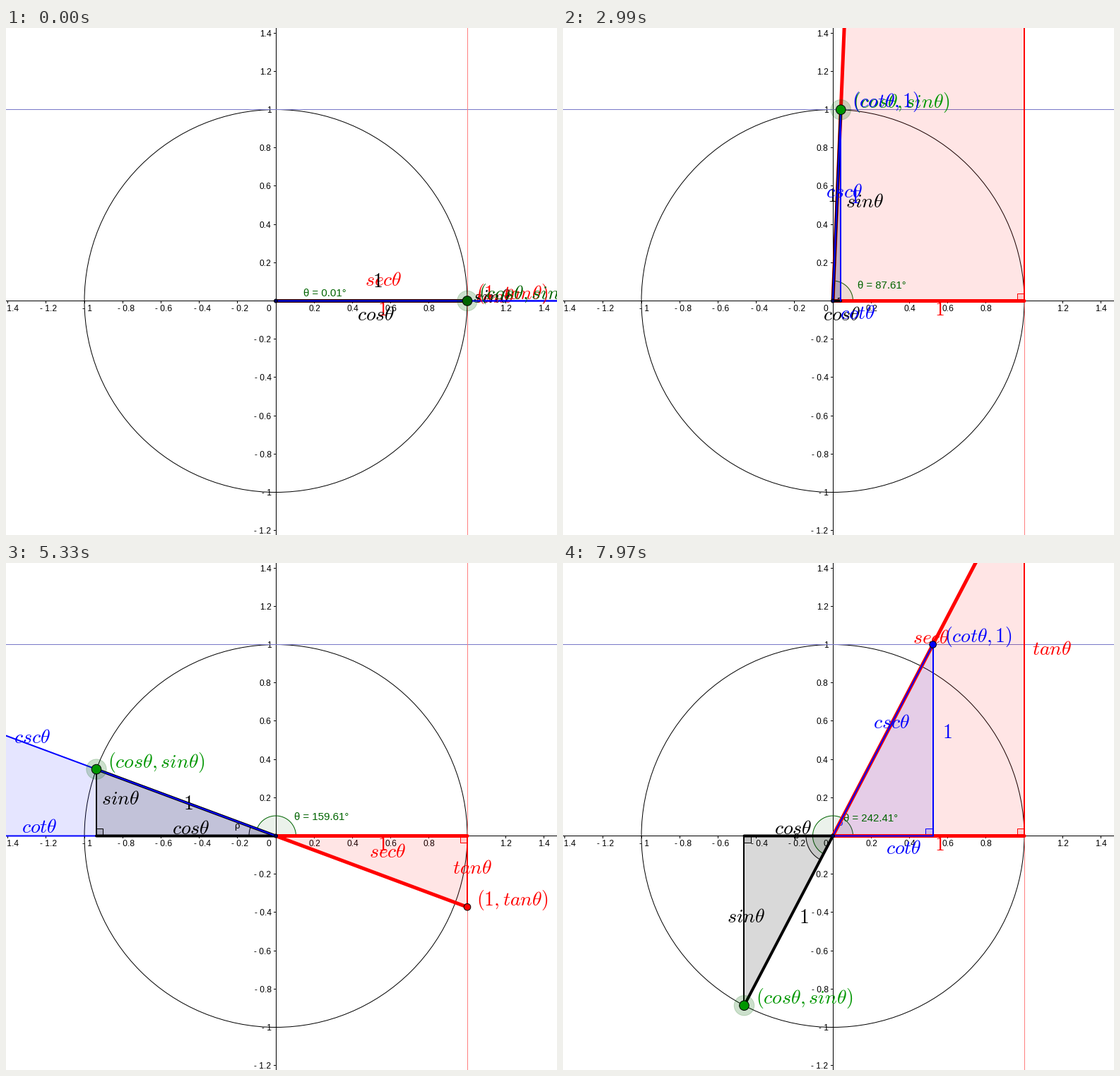
Write a matplotlib script that moves like this. It is 780 px wide and 718 px high and loops after 8 s.

```python
import numpy as np
import matplotlib.pyplot as plt
from matplotlib.animation import FuncAnimation
from matplotlib.patches import Circle, Polygon

plt.rcParams["path.snap"] = False

W, H, DPI = 780, 718, 100
PT = 72 / DPI
OX, OY, UNIT = 382, 386.5, 271
RED, BLUE, BLACK = "#ff0000", "#0000ff", "#000000"
GREEN, DARK_GREEN = "#009600", "#006400"
FRAMES, INTERVAL = 100, 80

fig = plt.figure(figsize=(W / DPI, H / DPI), dpi=DPI, facecolor="white")
ax = fig.add_axes([0, 0, 1, 1])
ax.set_xlim(0, W)
ax.set_ylim(H, 0)
ax.axis("off")


def px(x, y):
    return OX + UNIT * x, OY - UNIT * y


def crisp(v):
    """Centre of the pixel that holds v."""
    return np.floor(v) + 0.5


def line(color, width, z, xs=(), ys=(), cap="round"):
    return ax.plot(xs, ys, color=color, lw=width * PT, zorder=z,
                   solid_capstyle=cap)[0]


def grid_line(xs, ys, color=BLACK):
    line(color, 1, 0, xs, ys, "butt")


def area(color, alpha, z, edge=0):
    shape = Polygon([(0, 0), (0, 0), (0, 0)], closed=True, zorder=z)
    shape.set_facecolor((color, alpha))
    shape.set_edgecolor(color if edge else "none")
    shape.set_linewidth(edge * PT)
    return ax.add_patch(shape)


def dot(color, radius, z):
    return ax.add_patch(Circle((OX, OY), radius, fc=color, ec="black",
                               lw=PT, zorder=z))


def sans(text, x, y, size, color, z, ha="left"):
    return ax.text(x, y + 0.36 * size, text, family="Liberation Sans",
                   fontsize=size * PT, color=color, ha=ha, va="baseline",
                   zorder=z)


def formula(text, color, z):
    return ax.text(0, 0, f"${text}$", math_fontfamily="cm",
                   fontsize=27.8 * PT, color=color, ha="left",
                   va="baseline", zorder=z)


def place(label, x, y):
    label.set_position((x, y))
    label.set_visible(-200 < x < W + 20 and -20 < y < H + 40)


def sector(radius, start, stop):
    a = np.radians(np.linspace(start, stop, 60))
    arc = np.column_stack([OX + radius * np.cos(a), OY - radius * np.sin(a)])
    return np.vstack([[OX, OY], arc])


def corner(x, tip_y):
    """Right-angle mark at the foot (x, OY) of a triangle."""
    size = np.ceil(min(10, 0.33 * abs(x - OX), 0.33 * abs(tip_y - OY)))
    dx = size * np.sign(OX - x)
    dy = size * np.sign(tip_y - OY)
    x = crisp(x)
    return [(x, OY), (x + dx, OY), (x + dx, OY + dy), (x, OY + dy)]


def draw_grid():
    axis_x, axis_y = crisp(OX), crisp(OY)
    grid_line([0, W], [axis_y, axis_y])
    grid_line([axis_x, axis_x], [0, H])
    for i in range(-7, 8):
        if i == 0:
            continue
        v = i / 5
        text = f"{abs(v):g}"
        if v < 0:
            text = "- " + text
        x, y = map(crisp, px(v, v))
        grid_line([x, x], [axis_y, axis_y + 3.5])
        if i != 5:
            sans(text, x + (4 if v < 0 else 0), 397, 12, BLACK, 0, "center")
        if y < H:
            grid_line([axis_x - 3.5, axis_x], [y, y])
            sans(text, 375.5, y + 0.5, 12, BLACK, 0, "right")
    sans("0", 372, 397, 12, BLACK, 0, "center")
    ax.add_patch(Circle((OX, OY), UNIT, fill=False, ec=BLACK, lw=PT, zorder=0))
    x, y = map(crisp, px(1, 1))
    grid_line([0, W], [y, y], "#7878c8")
    grid_line([x, x], [0, H], "#ff8080")


draw_grid()

theta_arc = area(DARK_GREEN, 0.08, 1, 1)
rho_arc = area(BLACK, 0.08, 1, 1)
theta_text = sans("", 0, 0, 15, DARK_GREEN, 1.5)
rho_text = sans("ρ", 0, 0, 13, BLACK, 1.5, "center")
rho_blue = sans("ρ", 392, 367, 13, BLUE, 1.5, "center")

fills = {RED: area(RED, 0.1, 1.1), BLUE: area(BLUE, 0.1, 1.2),
         BLACK: area(BLACK, 0.15, 1.3)}
marks = {c: area(c, 0.1, 1.6, 1) for c in (RED, BLUE, BLACK)}
# base, upright side, slanted side
sides = {RED: [line(RED, w, 2) for w in (5, 2, 5)],
         BLUE: [line(BLUE, 2, z) for z in (3, 4.6, 5)],
         BLACK: [line(BLACK, w, 4) for w in (4, 2, 4)]}

sec_t = formula(r"sec\theta", RED, 2.5)
tan_t = formula(r"tan\theta", RED, 2.5)
red_one = formula("1", RED, 2.5)
cos_t = formula(r"cos\theta", BLACK, 4.5)
sin_t = formula(r"sin\theta", BLACK, 4.5)
hyp_one = formula("1", BLACK, 4.5)
csc_t = formula(r"csc\theta", BLUE, 5.5)
cot_t = formula(r"cot\theta", BLUE, 5.5)
blue_one = formula("1", BLUE, 5.5)
tan_pt = formula(r"(1,tan\theta)", RED, 7)
circ_pt = formula(r"(cos\theta,sin\theta)", GREEN, 7.5)
cot_pt = formula(r"(cot\theta,1)", BLUE, 8)

dot("#000060", 2.5, 6)
blue_dot = dot(BLUE, 4.8, 6)
red_dot = dot(RED, 4.8, 6)
halo = ax.add_patch(Circle((OX, OY), 14.2, fc=(DARK_GREEN, 0.2),
                           ec=(DARK_GREEN, 0.2), lw=PT, zorder=6.5))
green_dot = dot(GREEN, 6.8, 6.6)


def set_triangle(color, x, y):
    fills[color].set_xy([(OX, OY), (x, OY), (x, y)])
    marks[color].set_xy(corner(x, y))
    base, side, slant = sides[color]
    base.set_data([OX, x], [OY, OY])
    side.set_data([round(x), round(x)], [OY, y])
    slant.set_data([OX, x], [OY, y])


def set_angles(deg):
    half = np.radians(deg / 2)
    theta_arc.set_xy(sector(28.5, 0, deg))
    theta_text.set_text(f"θ = {deg:.2f}°")
    theta_text.set_position((405 + 16.3 * np.cos(half),
                             380.4 - 17 * np.sin(half)))
    obtuse = deg > 90
    rho_arc.set_visible(obtuse)
    rho_text.set_visible(obtuse)
    rho_blue.set_visible(deg > 180.5)
    rho_arc.set_xy(sector(38, 180, deg))
    mid = np.radians((180 + deg) / 2)
    rho_text.set_position((OX - 35.5 + 20 * np.cos(mid),
                           OY - 6.5 - 20 * np.sin(mid)))


def update(frame):
    step = round(np.interp(frame, [0, 22, 37, 57, 76, 90, 99],
                           [0, 44, 73, 115, 154, 181, 202]))
    deg = 0.01 + 1.2 * step
    t = np.radians(deg)
    c, s = np.cos(t), np.sin(t)
    cx, cy = px(c, s)
    rx, ry = px(1, s / c)
    bx, by = px(c / s, 1)

    set_angles(deg)
    set_triangle(RED, rx, ry)
    set_triangle(BLUE, bx, by)
    set_triangle(BLACK, cx, cy)
    red_dot.center = rx, ry
    blue_dot.center = bx, by
    halo.center = green_dot.center = cx, cy
    tone = DARK_GREEN if step == 0 else GREEN
    green_dot.set_facecolor(tone)
    circ_pt.set_color(tone)

    place(tan_pt, rx + 13.5, ry - 2)
    place(circ_pt, cx + 16.5, cy - 2.5)
    place(cot_pt, bx + 16, by - 4)

    # slanted labels sit 15 px off their side, along its normal
    slope = np.arctan(s / c)
    place(sec_t, (OX + rx) / 2 - 9 - 15 * np.sin(slope),
          (OY + ry) / 2 - 6 - 15 * np.cos(slope))
    lean = t % np.pi
    place(csc_t, (OX + bx) / 2 - 1 - 15 * np.sin(lean),
          (OY + by) / 2 - 10 - 15 * np.cos(lean))
    place(hyp_one, (OX + cx) / 2 + 1.5 - 15 * s,
          (OY + cy) / 2 - 4 - 15 * c)

    place(tan_t, rx + (10.5 if s / c > 0 else -20.5), (OY + ry) / 2 + 3)
    place(sin_t, cx + (7 if s > 0 else -24), (OY + cy) / 2 + 2.5)
    place(cos_t, (OX + cx) / 2 - 20, 414 if c > 0 else 384)
    place(cot_t, (OX + bx) / 2 + 4.5, 412 if c / s > 0 else 381.5)
    place(blue_one, bx + 13, 248)
    place(red_one, 526, 407)
    return []


anim = FuncAnimation(fig, update, frames=FRAMES, interval=INTERVAL,
                     repeat=True, repeat_delay=0, init_func=lambda: update(0))
plt.show()
```
